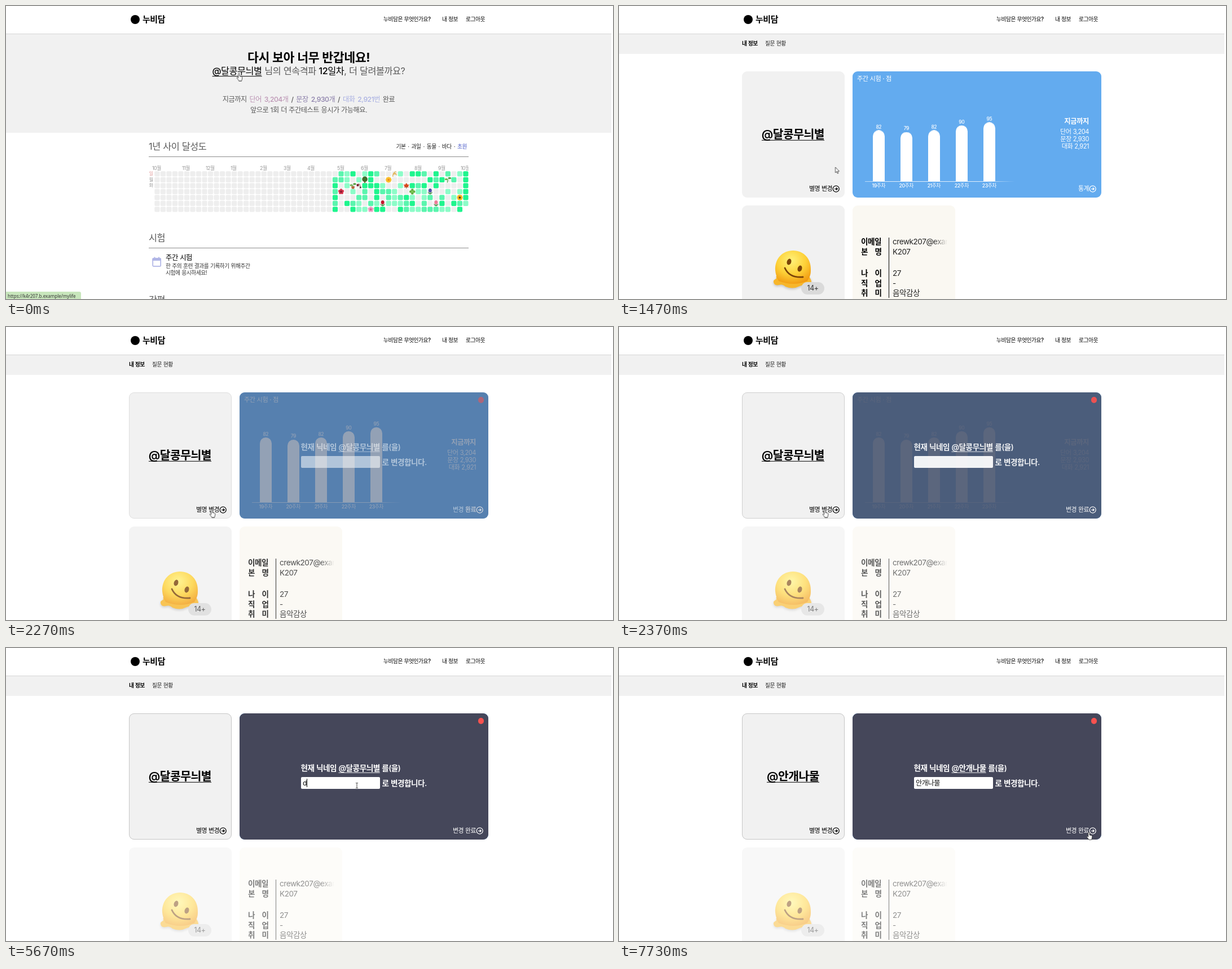
Recreate the animation shown at these times as an HTML page. Size 1076x520 px, loop 8000 ms.

```html
<!DOCTYPE html>
<html lang="ko">
<head>
<meta charset="utf-8">
<title>My page</title>
<style>
html, body { margin: 0; width: 100%; height: 100%; overflow: hidden; background: #fff; }
#stage { position: relative; width: 1076px; height: 520px; overflow: hidden;
  font-family: Inter, "Noto Sans CJK KR", "Noto Sans CJK", sans-serif; letter-spacing: -.03em; word-spacing: .03em; }
#stage div, p, svg { position: absolute; margin: 0; }
.layer { left: 0; top: 0; width: 1076px; height: 520px; }
p { line-height: 1.2; white-space: pre; transform: translateY(-50%); }
.c { transform: translate(-50%, -50%); }
.r { transform: translate(-100%, -50%); }
.m { font-weight: 500; }
.s { font-weight: 600; }
.b { font-weight: 700; }
.wide { word-spacing: .17em; }
u { text-underline-offset: 3px; text-decoration-thickness: 1.3px; text-decoration-skip-ink: none; }
.typed { left: 526px; top: 232px; height: 15px; line-height: 15px; font-size: 12.2px; color: #111; white-space: pre; }
.caret { border-right: 1px solid #111; }
</style>
</head>
<body>
<div id="stage"></div>
<script>
const LOOP = 8000;
const BRAND = '누비담', NICK = '@달콩무늬별', NEW_NAME = '안개나물';

// Markup helpers
const text = (x, y, size, str, cls = '', color = '#000') =>
  `<p class="${cls}" style="left:${x}px;top:${y}px;font-size:${size}px;color:${color}">${str}</p>`;
const box = (x, y, w, h, fill, radius = 0, extra = '', inner = '') =>
  `<div style="left:${x}px;top:${y}px;width:${w}px;height:${h}px;background:${fill};border-radius:${radius}px;${extra}">${inner}</div>`;
const layer = (id, html) => `<div class="layer" id="${id}">${html}</div>`;
const svg = html => `<svg class="layer" viewBox="0 0 1076 520">${html}</svg>`;
const tint = (color, str) => `<span style="color:${color}">${str}</span>`;
const goIcon = (x, color) => svg(`<g fill="none" stroke="${color}" stroke-width="1.25" transform="translate(${x} 324.5)">
  <circle r="5.5"/><path d="M-2.6 0H2.4M.2-2.2L2.5 0L.2 2.2"/></g>`);

// Timeline helpers: keys are [ms, value, easing to the next key]
const rules = [];
function track(selector, prop, keys) {
  const name = 'k' + rules.length;
  const steps = keys.map(([ms, value, ease = 'step-end']) =>
    `${ms / LOOP * 100}%{${prop}:${value};animation-timing-function:${ease}}`).join('');
  rules.push(`@keyframes ${name}{${steps}} ${selector}{animation:${name} ${LOOP}ms infinite}`);
}
function show(selector, ...ranges) {
  const keys = ranges[0][0] > 0 ? [[0, 0]] : [];
  for (const [from, to] of ranges) {
    keys.push([from, 1]);
    if (to < LOOP) keys.push([to, 0]);
  }
  track(selector, 'opacity', keys);
}

// Header
const header = box(221, 16, 16, 16, '#000', 8) +
  text(242, 24, 15, BRAND, 'b') +
  text(669, 24, 9.75, BRAND + '은 무엇인가요?', 'm') +
  text(773, 24, 9.75, '내 정보', 'm') +
  text(815, 24, 9.75, '로그아웃', 'm') +
  box(0, 48.5, 1073, 1, '#d6d6d6');

// Year grid with small plants
function yearGrid() {
  const greens = ['#eeeeee', '#8cfcc8', '#5af5ae', '#1ff58e'];
  let seed = 29;
  const rand = () => (seed = seed * 16807 % 2147483647) / 2147483647;
  const px = c => 263.3 + 10.52 * c, py = r => 293.3 + 10.5 * r;
  const flower = (n, petal, core) => Array.from({ length: n }, (_, i) => {
    const a = i / n * 2 * Math.PI - Math.PI / 2;
    return `<circle cx="${3 * Math.cos(a)}" cy="${3 * Math.sin(a)}" r="2.2" fill="${petal}"/>`;
  }).join('') + `<circle r="2" fill="${core}"/>`;
  const stem = bloom => `<path d="M0 5V0M0 4Q3 3 3.5 1M0 4Q-3 3-3.5 1" fill="none" stroke="#3d8b3a" stroke-width="1.2"/>
    <ellipse cy="-2" rx="2.9" ry="3.4" fill="${bloom}"/>`;
  const leaf = '<path d="M-1 5Q0 0 0-1" stroke="#4a9a3c" stroke-width="1.2" fill="none"/>' +
    '<ellipse cx="-3" cy="-1" rx="2.6" ry="1.5" fill="#6ab04a"/><ellipse cx="3" cy="-3" rx="2.8" ry="1.6" fill="#4d9b3f"/>';
  const plants = [
    [31, 3, flower(5, '#d8324a', '#8f1830')],
    [33, 2, leaf + '<path d="M-3 1H3L2 5.5H-2z" fill="#b5653a"/>'],
    [34, 2, '<path d="M2 5Q3-4-1-3" fill="none" stroke="#6a6a3a"/><circle cx="-2" cy="-1" r="2.2" fill="#7d2030"/><circle cx="3" cy="3" r="1.3" fill="#552a2a"/>'],
    [35, 1, '<rect x="-1" y="1" width="2" height="4.5" fill="#7a4b2c"/><circle cy="-1" r="4.8" fill="#3f6f2c"/>'],
    [36, 6, flower(5, '#f0a0c4', '#d9608f')],
    [38, 5, stem('#c5162e')],
    [39, 1, flower(8, '#fbc02d', '#f08c1a')],
    [40, 0, '<path d="M-3 5Q-3-3 3-4M-2 1L3-1M-1-2L4 2" fill="none" stroke="#e0b04c" stroke-width="1.3"/>'],
    [42, 2, '<path d="M0-5L2-2L5-2L3 1L4 3L0 2.5L-4 3L-3 1L-5-2L-2-2z" fill="#d9481c"/><path d="M0 1V5" stroke="#8c3a18"/>'],
    [43, 3, flower(4, '#5fae3e', '#7cc653')],
    [46, 3, stem('#4a4fa8')],
    [47, 5, stem('#f07a98')],
    [49, 1, leaf],
    [51, 4, flower(8, '#f9b81e', '#5b3a1c')],
  ];
  const taken = new Set(plants.map(([c, r]) => c + ',' + r));
  let out = '';
  for (let c = 0; c < 53; c++) for (let r = 0; r < 7; r++) {
    if (c === 52 && r === 6) continue;
    let level = 0;
    if (c >= 30) {
      const v = rand();
      level = v < .33 ? 0 : v < .57 ? 1 : v < .77 ? 2 : 3;
      if (c === 30) level = r ? 3 - r % 2 : 0;
      if (c === 52) level = r < 5 ? 3 : 1;
      if (taken.has(c + ',' + r)) level = 0;
    }
    out += `<rect x="${px(c)}" y="${py(r)}" width="9.2" height="9.2" rx="2" fill="${greens[level]}"/>`;
  }
  for (const [c, r, art] of plants)
    out += `<g transform="translate(${px(c) + 4.6} ${py(r) + 4.6})">${art}</g>`;
  return svg(out);
}

const months = [[259, 10], [312, 11], [354, 12], [398, 1], [450, 2], [492, 3], [534, 4],
  [587, 5], [629, 6], [671, 7], [724, 8], [766, 9], [806, 10]];
const gray = '#5a5a5a';

const home = layer('home',
  box(0, 49.5, 1073, 175.5, '#f1f1f1') +
  text(536.5, 91, 21.7, '다시 보아 너무 반갑네요!', 'b c') +
  text(536.5, 116, 16.3, `${tint('#000', `<u class="m">${NICK}</u>`)} 님의 연속격파 <span class="m" style="color:#000">12일차</span>, 더 달려볼까요?`, 'c', gray) +
  text(536.5, 165.5, 12.2, `지금까지 ${tint('#bb93b3', '단어 3,204개')} / ${tint('#8a7ea9', '문장 2,930개')} / ${tint('#a9b0e2', '대화 2,921번')} 완료`, 'm c wide', gray) +
  text(536.5, 184.5, 12.2, '앞으로 1회 더 주간테스트 응시가 가능해요.', 'c', gray) +
  text(253, 250, 16.3, '1년 사이 달성도', '', gray) +
  text(817, 250, 9.75, `기본 · 과일 · 동물 · 바다 · ${tint('#4a5ac8', '초원')}`, 'r wide', '#222') +
  box(253, 267, 567, 1, '#8c8c8c') +
  box(0, 280, 820, 14, 'none', 0, 'overflow:hidden', months.map(([x, n]) => text(x, 8, 8.8, n + '월', '', '#999')).join('')) +
  text(253.5, 298, 8.2, '일', '', '#e09a9a') +
  text(253.5, 308.5, 8.2, '월', '', '#999') +
  text(253.5, 319, 8.2, '화', '', '#999') +
  yearGrid() +
  text(253, 412, 16.3, '시험', '', gray) +
  box(253, 428.5, 567, 1, '#8c8c8c') +
  svg(`<rect x="260.2" y="447.8" width="14" height="14" rx="1.4" fill="none" stroke="#b0b5e6" stroke-width="1.7"/>
    <path d="M259.5 448H275V452H259.5zM262.5 445.5H264.5V449H262.5zM270 445.5H272V449H270z" fill="#b0b5e6"/>`) +
  text(283, 446.5, 12.4, '주간 시험', 'm') +
  text(283, 462, 9.75, '한 주의 훈련 결과를 기록하기 위해주간', '', '#333') +
  text(283, 473.5, 9.75, '시험에 응시하세요!', '', '#333') +
  text(253, 522, 16.3, '간편', '', gray) +
  box(0, 507, 133, 13, '#c8e6bc', 0, 'border-top-right-radius:3px;font-family:Noto Sans,sans-serif;letter-spacing:0',
    text(3, 7.5, 8, 'https://k4r207.b.example/mylife', '', '#333')));

// Profile page
const bars = [82, 79, 82, 90, 95].map((score, i) => {
  const x = 460.3 + 49 * i, h = score * 1.4, top = 311 - h;
  return box(x - 10.5, top, 21, h, 'none', 0, 'overflow:hidden',
      `<div class="rise" style="--h:${h}px;width:21px;height:${h}px;background:#fff;border-radius:10.5px 10.5px 0 0"></div>`) +
    `<div class="rise" style="--h:${h}px">${text(x, top - 6.2, 8.6, score, 'm c', '#fff')}</div>` +
    text(x, 319, 8.8, `${19 + i}주차`, 'm c', '#fff');
}).join('');

const stats = layer('stats',
  text(422, 129.5, 11.2, '주간 시험 · 점', 'm', '#fff') +
  bars +
  box(436, 310.5, 266, 1, 'linear-gradient(90deg,#fff8,#fffc 15%,#fffc 80%,#fff0)') +
  text(833, 205, 12.4, '지금까지', 'b r', '#fff') +
  ['단어 3,204', '문장 2,930', '대화 2,921'].map((s, i) => text(833, 224 + 13.2 * i, 11.1, s, 'r', '#fff')).join('') +
  text(833, 324.5, 10.9, '통계', 'm r', '#fff') + goIcon(839.7, '#fff'));

const face = svg(`<defs>
  <radialGradient id="skin" cx=".45" cy=".3" r=".75"><stop offset="0" stop-color="#fff27a"/><stop offset=".55" stop-color="#fdd037"/><stop offset="1" stop-color="#f0960f"/></radialGradient></defs>
  <path d="M278 480C282 486 273 484 274 490Q275 497 284 495Q290 493 295 498Q308 503 318 498Q326 494 333 497Q342 497 341 490Q341 486 337 480z"
    fill="#f7b62b" style="filter:drop-shadow(0 2px 2px #0003)"/>
  <path d="M277 469C276 448 290 434 308.5 434S341 448 340 469C340 479 337 482 334 488Q322 493 309 493T283 488Q278 480 277 469z" fill="url(#skin)"/>
  <g fill="#7a4308"><ellipse cx="301.5" cy="454" rx="3.8" ry="5.6" transform="rotate(18 301.5 454)"/>
  <ellipse cx="320.5" cy="466" rx="3.8" ry="5.6" transform="rotate(18 320.5 466)"/></g>
  <path d="M294 465Q302 483 326 481" fill="none" stroke="#7a4308" stroke-width="2.8" stroke-linecap="round"/>`);

const rows = [[418, '이메일'], [435.5, '본명', 'K207'], [474, '나이', '27'], [491.5, '직업', '-'], [509, '취미', '음악감상']];
const info = rows.map(([y, label, value = '']) =>
  (label.length > 2 ? text(429, y, 13.6, label, 's')
    : text(429, y, 13.6, label[0], 's') + text(465.5, y, 13.6, label[1], 's r')) +
  text(485, y, 13.6, value, '', '#222')).join('') +
  box(485, 408, 97, 20, 'none', 0, 'overflow:hidden;mask-image:linear-gradient(90deg,#000 74%,transparent)',
    text(0, 10, 13.6, 'crewk207@exam', '', '#222')) +
  box(478, 411, 1.2, 107, '#000');

const lower = layer('lower',
  box(217.5, 354, 182, 190, '#f1f1f1', 9) + face +
  box(323, 490, 41, 22, '#dadada', 11, '', text(20.5, 11, 12.4, '14+', 'c', '#333')) +
  box(413.5, 354, 182, 190, '#faf8f2', 9) + info);

const bothNames = (x, y, size, cls, make) =>
  text(x, y, size, make(NICK), cls[0] + ' old', cls[1]) + text(x, y, size, make('@' + NEW_NAME), cls[0] + ' new', cls[1]);

// Typed states: [start, text, caret]
const states = [[3200, '', 1], [3730, '', 0], [4270, '', 1], [4770, '', 0],
  [5000, 'd', 1], [5130, 'dk', 1], [5230, 'dks', 1], [5470, 'dk', 1], [5670, 'd', 1], [5770, '', 1]];
['ㅇ', '아', '안', '안ㄱ', '안개', '안갠', '안개나', '안개남', '안개나무', NEW_NAME]
  .forEach((s, i) => states.push([5970 + 70 * i, s, 1]));
states.push([7130, NEW_NAME, 0]);
const typed = states.map(([at, s, caret], i) => {
  show('#typed' + i, [at, states[i + 1] ? states[i + 1][0] : LOOP]);
  return `<div id="typed${i}" class="typed${caret ? ' caret' : ''}">${s}</div>`;
}).join('');

const veil = layer('veil', box(414, 116, 441, 224, '#45475a', 9));
const modal = layer('modal',
  box(836.5, 123.5, 10.6, 11, '#fa524f', 6) +
  bothNames(522.5, 213, 13.6, ['s', '#fff'], n => `현재 닉네임 <u>${n}</u> 를(을)`) +
  box(522.5, 229, 140.5, 21, '#fff', 2) + typed +
  text(666.5, 239.5, 13.6, '로 변경합니다.', 's', '#fff') +
  text(833, 324.5, 10.9, '변경 완료', 'm r', '#fff') + goIcon(839.7, '#fff'));

const profile = layer('profile',
  box(0, 49.5, 1073, 35, '#f1f1f1') +
  text(218, 67, 9.75, '내 정보', 'b') +
  text(259, 67, 9.75, '질문 현황', '', '#222') +
  box(217.5, 116, 182, 224, '#f1f1f1', 9) +
  `<div id="edge" style="left:217.5px;top:116px;width:180px;height:222px;border:1px solid #c6c6c6;border-radius:9px"></div>` +
  bothNames(308.5, 228, 20.4, ['s c', '#000'], n => `<u>${n}</u>`) +
  text(378, 324.5, 10.9, '별명 변경', 'm r') + goIcon(384.7, '#000') +
  box(414, 116, 441, 224, '#63abef', 9) +
  stats + lower + veil + modal);

const cursor = svg(`<g id="cursor" stroke-linejoin="round">
  <path id="arrow" d="M0 0V9.8L2.2 7.8L3.8 11.3L5.3 10.6L3.8 7.2H6.8z" fill="#fff" stroke="#222" stroke-width=".8"/>
  <path id="hand" d="M-1.2 1.2a1.2 1.2 0 0 1 2.4 0V5L4.6 5.8Q6 6.2 5.9 7.8L5.4 10.5Q5.2 12 4.6 13.3H-.2Q-1.6 10.8-3.6 8.6Q-4 7.2-3 7Q-2.2 7-1.2 8.3z" fill="#fff" stroke="#222" stroke-width=".8"/>
  <path id="beam" d="M-2-4.5H-.6L0-4L.6-4.5H2M0-4V4M-2 4.5H-.6L0 4L.6 4.5H2" fill="none" stroke="#333" stroke-width=".9"/></g>`);

// Motion
show('#home', [0, 900]);
show('#profile', [900, LOOP]);
track('.rise', 'transform', [[0, 'translateY(var(--h))'], [920, 'translateY(var(--h))', 'ease-in-out'], [1730, 'translateY(0)']]);
track('#veil,#edge', 'opacity', [[0, 0], [2150, 0, 'linear'], [2435, 1]]);
track('#modal', 'opacity', [[0, 0], [2130, 0, 'linear'], [2390, 1]]);
track('#stats', 'opacity', [[0, 1], [2130, 1, 'linear'], [2570, 0]]);
track('#lower', 'opacity', [[0, 1], [2140, 1, 'linear'], [2470, .5]]);
show('.old', [0, 7630]);
show('.new', [7630, LOOP]);

const at = (x, y) => `translate(${x}px,${y}px)`;
track('#cursor', 'transform', [
  [0, at(413, 119.5)], [900, at(413, 119.5), 'ease-in-out'],
  [1470, at(383.7, 285.7), 'ease-out'], [1690, at(365, 324.5)],
  [2570, at(365, 324.5), 'ease-in-out'], [2970, at(622, 244)],
  [7130, at(622, 244), 'ease-in-out'], [7460, at(858, 338), 'ease-in-out'], [7630, at(833, 327)]]);
show('#hand', [0, 900], [1630, 2620], [7540, LOOP]);
show('#arrow', [900, 1630], [2620, 2840], [7190, 7540]);
show('#beam', [2840, 7190]);

document.head.appendChild(document.createElement('style')).textContent = rules.join('\n');
document.getElementById('stage').innerHTML = header + home + profile + cursor;
</script>
</body>
</html>
```
